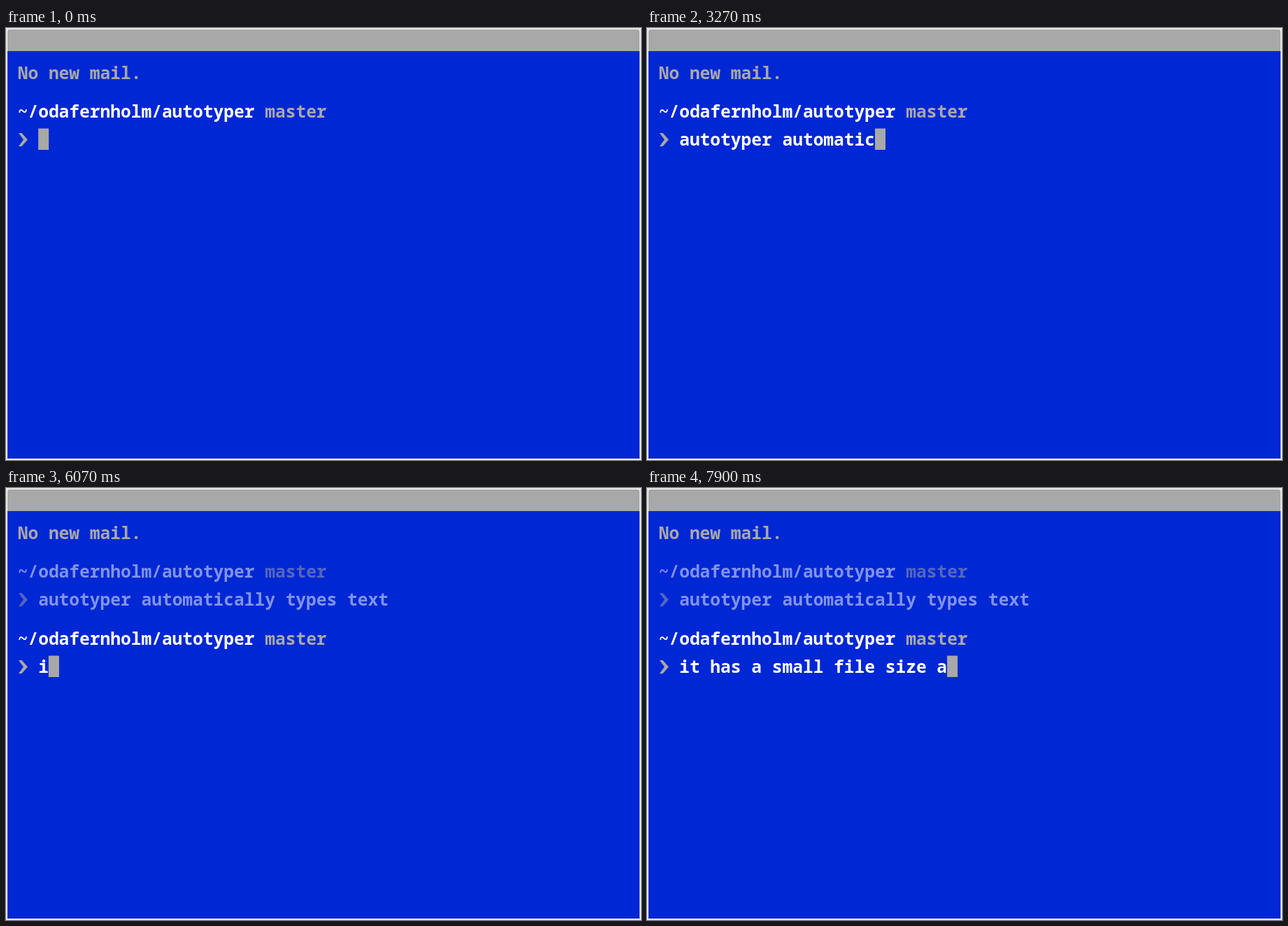
Recreate the animation shown at these times as an HTML page with a canvas. Size 908 by 617 pixels, loop 8000 ms.

```html
<!DOCTYPE html>
<html lang="en">
<head>
<meta charset="utf-8">
<title>Typing terminal</title>
<style>
  html, body { margin: 0; height: 100%; overflow: hidden; background: #fff; }
  canvas { display: block; }
</style>
</head>
<body>
<canvas id="stage" width="908" height="617"></canvas>
<script>
const ctx = document.getElementById('stage').getContext('2d');
const LOOP = 8000, ENTER = 5230, FADE = 240;
const CELL = 14.73, LEFT = 16.7;
const BLUE = '#0027d4', GREY = '#a8a8a8', WHITE = '#fff';
const PATH = '~/odafernholm/autotyper';

// step: ms per key; sway: how many keys the rhythm drifts from an even pace
const first = { y: 128, text: 'autotyper automatically types text', start: 1770, step: 80, sway: 1 };
const second = { y: 224, text: 'it has a small file size a', start: 6060, step: 72, sway: 0 };

function typedCount({ text, start, step, sway }, t) {
  const elapsed = t - start;
  if (elapsed < 0) return 0;
  const drift = sway * Math.sin(elapsed * 2 * Math.PI / 1500);
  return Math.min(text.length, Math.floor(1 + elapsed / step + drift));
}

function write(text, column, y, color) {
  ctx.fillStyle = color;
  ctx.fillText(text, LEFT + column * CELL, y);
}

function chevron(y) {
  ctx.fillStyle = GREY;
  ctx.beginPath();
  for (const side of [-1, 1]) {
    ctx.moveTo(25, y);
    ctx.lineTo(18, y + side * 9.5);
    ctx.lineTo(22.5, y + side * 9.5);
    ctx.lineTo(31, y);
  }
  ctx.fill();
}

function drawPrompt(line, t, active) {
  const { y, text } = line;
  const count = typedCount(line, t);
  write(PATH, 0, y, WHITE);
  write('master', PATH.length + 1, y, GREY);
  chevron(y + 31.5);
  write(text.slice(0, count), 2, y + 40, WHITE);
  if (active) {
    ctx.fillStyle = GREY;
    ctx.fillRect(LEFT + (count + 2) * CELL, y + 15.5, 15, 30.5);
  }
}

function panel(inset, color, radius) {
  ctx.fillStyle = color;
  ctx.beginPath();
  ctx.roundRect(inset, inset, 908 - 2 * inset, 617 - 2 * inset, radius);
  ctx.fill();
}

function drawWindow() {
  panel(0, WHITE, 0);
  panel(0, '#d4d4d8', 4);
  panel(1, WHITE, 3);
  panel(2, GREY, [3, 3, 0, 0]);
  ctx.fillStyle = BLUE;
  ctx.fillRect(2, 33, 904, 582);
}

function draw(now) {
  const t = now % LOOP;
  const entered = t >= ENTER;
  const fade = Math.min(1, Math.max(0, (t - ENTER) / FADE));
  ctx.font = 'bold 24.55px "Noto Sans Mono", monospace';
  drawWindow();
  write('No new mail.', 0, 73, GREY);
  ctx.globalAlpha = 1 - 0.5 * fade * fade * (3 - 2 * fade);
  drawPrompt(first, t, !entered);
  ctx.globalAlpha = 1;
  if (entered) drawPrompt(second, t, true);
  requestAnimationFrame(draw);
}
requestAnimationFrame(draw);
</script>
</body>
</html>
```
